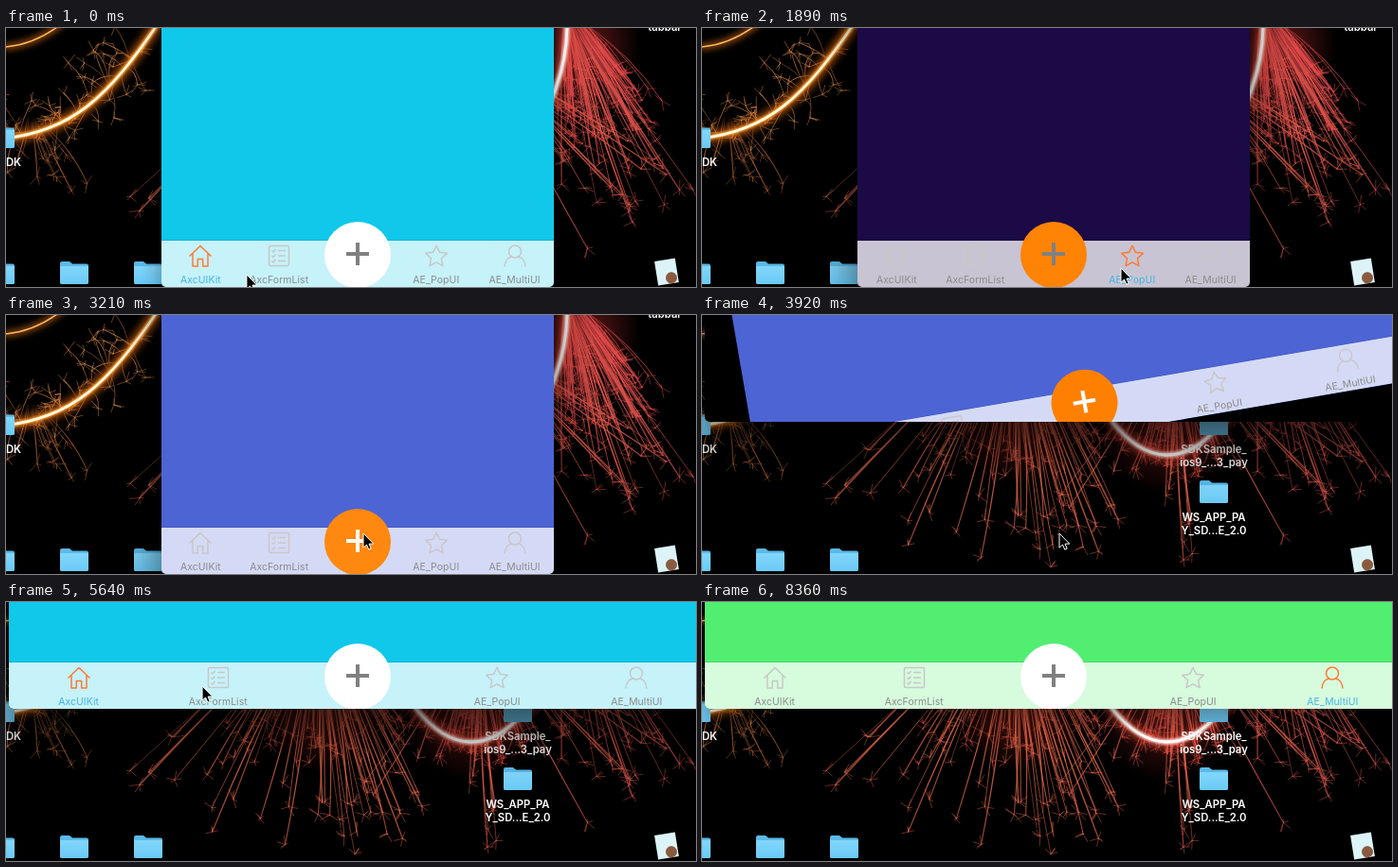
An HTML page with a canvas for the animation above (8.46 s loop, 728 by 274 pixels).

```html
<!DOCTYPE html>
<html lang="en">
<head>
<meta charset="utf-8">
<title>Tab bar demo</title>
<style>
  html, body { margin: 0; width: 728px; height: 274px; overflow: hidden; background: #000; }
  body { position: relative; font-family: Inter, "Open Sans", sans-serif; }
  canvas, #desk, #cursor { position: absolute; left: 0; top: 0; }
  #desk text { font: 600 11.3px Inter, sans-serif; fill: #fff; text-anchor: middle; }
  #window { position: absolute; overflow: hidden; border-radius: 5px; background: #000; }
  #screen { position: absolute; left: 50%; top: 50%; overflow: hidden; }
  #bar { position: absolute; left: 0; right: 0; bottom: 0; height: 49px; display: flex;
         background: rgba(255,255,255,.76); box-shadow: 0 -.5px rgba(0,0,0,.18); }
  .tab { flex: 1 1 0; position: relative; color: #c8c8c8; text-align: center; }
  .tab svg { position: absolute; left: 50%; top: 4px; margin-left: -12px; overflow: visible; }
  .tab span { position: absolute; left: 0; right: 0; top: 35px; font-size: 10.4px; line-height: 13px;
              letter-spacing: .1px; color: #8a8a8a; white-space: nowrap; }
  .tab.on { color: #ff7a33; }
  .tab.on span { color: #42b4e4; }
  #plus { position: absolute; left: 50%; bottom: -.5px; width: 70px; height: 70px; margin-left: -35px;
          border-radius: 50%; }
  #plus svg { position: absolute; left: 23px; top: 22px; }
  #cursor { overflow: visible; }
</style>
</head>
<body>
<canvas id="sky" width="728" height="274"></canvas>
<svg id="desk" width="728" height="274">
  <defs>
    <linearGradient id="blue" x2="0" y2="1"><stop stop-color="#82d6fb"/><stop offset="1" stop-color="#6acaf6"/></linearGradient>
    <g id="folder">
      <path d="M-15-10q0-2 2-2h8l3 2.5h15q2 0 2 2V10q0 2-2 2h-26q-2 0-2-2Z" fill="#5ab9e8"/>
      <path d="M-15-7H15V10q0 2-2 2h-26q-2 0-2-2Z" fill="url(#blue)"/>
    </g>
  </defs>
  <g id="folders"></g>
  <g transform="translate(697 258) rotate(-9)">
    <rect x="-11" y="-13" width="22" height="26" fill="#dcf4f7"/>
    <circle cx="4" cy="7" r="6" fill="#8a5a40"/>
  </g>
  <text x="8" y="146" style="text-anchor:middle">DK</text>
  <text x="695" y="3">tabbar</text>
  <text x="540" y="146">SDKSample_</text>
  <text x="540" y="160">ios9_...3_pay</text>
  <text x="540" y="218">WS_APP_PA</text>
  <text x="540" y="232">Y_SD...E_2.0</text>
</svg>
<div id="window">
  <div id="screen">
    <div id="bar"></div>
    <div id="plus"><svg width="24" height="24"><path d="M12 0V24M0 12H24" stroke="currentColor" stroke-width="4"/></svg></div>
  </div>
</div>
<svg id="cursor" width="12" height="18">
  <path d="M0 0V15.2L3.5 12L5.8 17.2L8.2 16.2L6 11.1H10.8Z" fill="#000" stroke="#fff" stroke-width="1"/>
</svg>
<script>
const LOOP = 8460, FADE = 300;
const TURN_START = 3630, TURN_TIME = 370;
const ACTIVE_FROM = 290, ACTIVE_TO = 8360;
const CENTER = { x: 371, y: -94 };
const SHORT = 414, LONG = 736;
const $ = id => document.getElementById(id);
const mix = (a, b, p) => a + (b - a) * p;
const clamp = p => Math.min(1, Math.max(0, p));

const starPoints = Array.from({ length: 10 }, (_, i) => {
  const r = i % 2 ? 5.8 : 11.8, a = i * Math.PI / 5 - Math.PI / 2;
  return (12 + r * Math.cos(a)).toFixed(2) + ' ' + (13 + r * Math.sin(a)).toFixed(2);
});
const TABS = [
  { name: 'AxcUIKit', color: '#10c8ea', icon: 'M.5 12.5L12 1.5L23.5 12.5M4 9.5V23H9.3V15.5H14.7V23H20V9.5' },
  { name: 'AxcFormList', color: '#b0508c',
    icon: 'M3 1.5H21Q22.5 1.5 22.5 3V21Q22.5 22.5 21 22.5H3Q1.500 22.5 1.500 21V3Q1.500 1.500 3 1.500Z' +
      [6.5, 12, 17.5].map(y => `M4.5 ${y}l1.500 1.500l2.500-3M11 ${y}h8`).join('') },
  { name: '', color: '#4c64d4' },
  { name: 'AE_PopUI', color: '#1b0a46', icon: 'M' + starPoints.join('L') + 'Z' },
  { name: 'AE_MultiUI', color: '#52ee72',
    icon: 'M12 1A6.500 6.500 0 1 1 12 14A6.500 6.500 0 1 1 12 1M1 23.500C1.500 17 5 13.500 8.500 13M23 23.500C22.500 17 19 13.500 15.500 13' }
];

// [time, selected tab]
const TAPS = [[-1000, 0], [830, 1], [1290, 2], [1885, 3], [2410, 4], [2930, 2],
  [5110, 0], [5690, 1], [6230, 2], [6720, 3], [7400, 4]];

// [time, x, y] of the pointer tip
const POINTER = [[0, 254, 261], [60, 250, 259], [120, 244, 257], [290, 244, 257], [450, 212, 250],
  [600, 212, 250], [800, 284, 252], [900, 288, 252], [1120, 366, 244], [1590, 366, 244],
  [1830, 442, 254], [1900, 442, 254], [2120, 480, 254], [2240, 538, 253], [2470, 538, 253],
  [2700, 377, 231], [4340, 377, 231], [4700, 150, 120], [4870, 42, 75], [4930, 60, 79],
  [5170, 60, 79], [5400, 200, 89], [5600, 200, 89], [5640, 207, 89], [5730, 212, 89],
  [5930, 366, 80], [6300, 366, 80], [6520, 510, 88], [6720, 522, 88], [6870, 582, 89],
  [7160, 660, 86], [7500, 660, 86], [8060, 690, 292], [LOOP, 690, 292]];

function buildPage() {
  $('folders').innerHTML = [[-6, 115], [540, 115], [540, 187], [-6, 259], [72, 259], [150, 259]]
    .map(([x, y]) => `<use href="#folder" x="${x}" y="${y}"/>`).join('');
  $('bar').innerHTML = TABS.map(({ name, icon }) => `<div class="tab">${icon ?
    `<svg width="24" height="24" fill="none" stroke="currentColor" stroke-width="1.5" stroke-linejoin="round"><path d="${icon}"/></svg>` : ''
  }<span>${name}</span></div>`).join('');
}

function paintSky() {
  const g = $('sky').getContext('2d');
  let seed = 11;
  const rnd = (a = 0, b = 1) => {
    seed = (seed * 16807) % 2147483647;
    return mix(a, b, seed / 2147483647);
  };
  const line = (x0, y0, x1, y1, bend, color, width) => {
    g.strokeStyle = color;
    g.lineWidth = width;
    g.beginPath();
    g.moveTo(x0, y0);
    g.quadraticCurveTo((x0 + x1) / 2 + bend, (y0 + y1) / 2 - Math.abs(bend), x1, y1);
    g.stroke();
  };
  const spark = (x0, y0, x1, y1, rgb, width) => {
    const fade = g.createLinearGradient(x0, y0, x1, y1);
    fade.addColorStop(0, `rgba(${rgb},.15)`);
    fade.addColorStop(.6, `rgba(${rgb},.85)`);
    fade.addColorStop(1, `rgba(${rgb},.6)`);
    line(x0, y0, x1, y1, rnd(-9, 9), fade, width);
    for (let i = 0; i < 5; i++) {
      const a = rnd(0, 2 * Math.PI), r = rnd(3, 11);
      line(x1, y1, x1 + r * Math.cos(a), y1 + r * Math.sin(a), 0, `rgba(${rgb},.65)`, .7);
    }
  };
  const glow = (x, y, r, rgb, alpha) => {
    const fill = g.createRadialGradient(x, y, 0, x, y, r);
    fill.addColorStop(0, `rgba(${rgb},${alpha})`);
    fill.addColorStop(1, `rgba(${rgb},0)`);
    g.fillStyle = fill;
    g.fillRect(x - r, y - r, 2 * r, 2 * r);
  };
  const fan = (count, x, y, from, to, near, far, rgb) => {
    for (let i = 0; i < count; i++) {
      const a = rnd(from, to) * Math.PI / 180, r = rnd(near, far);
      spark(x + .2 * r * Math.cos(a), y + .2 * r * Math.sin(a),
        x + r * Math.cos(a), y + r * Math.sin(a), rgb, rnd(.6, 1.6));
    }
  };
  const trail = (d, strokes) => strokes.forEach(([color, width, blur]) => {
    g.strokeStyle = color;
    g.lineWidth = width;
    g.filter = blur ? `blur(${blur}px)` : 'none';
    g.stroke(new Path2D(d));
    g.filter = 'none';
  });

  g.fillStyle = '#000';
  g.fillRect(0, 0, 728, 274);
  g.lineCap = 'round';
  glow(335, 105, 75, '190,50,35', .45);
  glow(490, 115, 75, '180,50,40', .45);
  glow(605, 15, 65, '210,50,50', .5);

  // warm embers thrown off the left trail
  for (let i = 0; i < 52; i++) {
    const p = rnd(), x = 158 * p, y = 115 - 115 * p * p;
    spark(x, y, x + rnd(-35, 15), y + rnd(-45, 42), '225,140,70', rnd(.5, 1));
  }
  fan(16, 25, 85, 40, 150, 45, 105, '170,95,50');
  trail('M0 20C22 18 40 10 58-4', [['rgba(255,130,30,.5)', 7, 3], ['#ffb45c', 1.5, 0]]);
  trail('M-4 117C70 110 108 72 160-4', [['rgba(255,120,20,.7)', 11, 4], ['#ffa83c', 5, 1], ['#fffbe2', 2.6, .5]]);

  // red fans
  fan(52, 330, 15, 42, 138, 105, 165, '215,85,65');
  fan(36, 330, 0, 62, 120, 170, 285, '230,105,75');
  fan(8, 330, 0, 118, 140, 190, 285, '220,100,70');
  fan(75, 500, 35, 20, 160, 85, 140, '215,75,65');
  fan(26, 500, 25, 30, 130, 130, 240, '225,95,75');
  fan(75, 590, -25, 45, 92, 60, 155, '230,75,75');
  fan(26, 585, -25, 52, 92, 140, 245, '220,85,75');
  trail('M592-4C592 40 575 95 545 118C510 158 470 160 432 112',
    [['rgba(255,80,60,.6)', 12, 4], ['rgba(255,205,195,.95)', 6, 1], ['#fff', 2.8, 0]]);
}

function pointerAt(t) {
  const i = POINTER.findIndex(([time]) => time > t);
  const [t0, x0, y0] = POINTER[i - 1], [t1, x1, y1] = POINTER[i];
  const p = (t - t0) / (t1 - t0);
  return [mix(x0, x1, p), mix(y0, y1, p)];
}

function render(t) {
  const tapIndex = TAPS.findLastIndex(([time]) => time <= t);
  const [tapTime, tab] = TAPS[tapIndex];
  const wasCenter = tapIndex > 0 && TAPS[tapIndex - 1][1] === 2;
  const ramp = clamp((t - tapTime) / FADE);
  const orange = tab === 2 ? ramp : wasCenter ? 1 - ramp : 0;

  const landscape = t >= TURN_START;
  const width = landscape ? LONG : SHORT, height = landscape ? SHORT : LONG;
  const active = t >= ACTIVE_FROM && t < ACTIVE_TO;
  Object.assign($('window').style, {
    left: CENTER.x - width / 2 + 'px', top: CENTER.y - height / 2 + 'px',
    width: width + 'px', height: height + 'px',
    boxShadow: active ? '0 26px 48px rgba(0,0,0,.65)' : '0 10px 24px rgba(0,0,0,.4)'
  });

  const turn = .5 - .5 * Math.cos(Math.PI * clamp((t - TURN_START) / TURN_TIME));
  Object.assign($('screen').style, {
    width: mix(SHORT, LONG, turn) + 'px', height: mix(LONG, SHORT, turn) + 'px',
    transform: `translate(-50%,-50%) rotate(${landscape ? -90 * (1 - turn) : 0}deg)`,
    background: TABS[tab].color
  });
  [...$('bar').children].forEach((el, i) => el.classList.toggle('on', i === tab));
  $('plus').style.background = `rgb(255,${255 - 127 * orange},${255 - 255 * orange})`;
  $('plus').style.color = tab === 2 ? '#fff' : '#808080';

  const [x, y] = pointerAt(t);
  $('cursor').style.transform = `translate(${x}px,${y}px)`;
}

buildPage();
paintSky();
const start = performance.now();
function tick() {
  render((performance.now() - start) % LOOP);
  requestAnimationFrame(tick);
}
tick();
</script>
</body>
</html>
```
